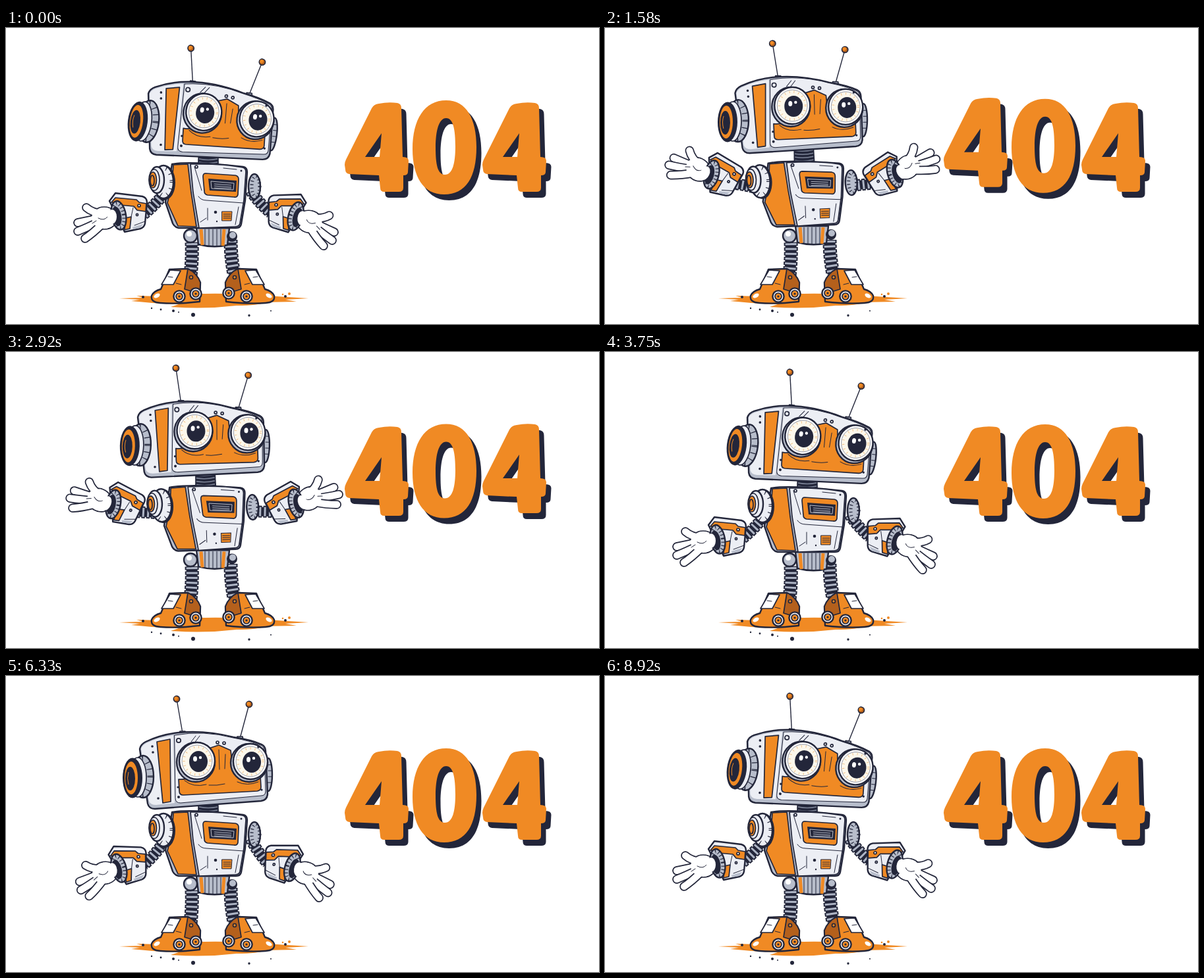
Write an HTML page that moves like this. It is 900x450 px and loops after 9.01 s.

```html
<!DOCTYPE html>
<html lang="en">
<head>
<meta charset="utf-8">
<title>404 robot</title>
<style>
  html, body { margin: 0; width: 100%; height: 100%; overflow: hidden; background: #fff; }
  svg { display: block; width: 900px; height: 450px; }
  .ink { stroke: #23263a; stroke-width: 1.7; stroke-linejoin: round; stroke-linecap: round; }
  .thin { stroke: #23263a; stroke-width: 1; fill: none; stroke-linecap: round; }
  .thick { stroke: #23263a; stroke-width: 2.4; stroke-linejoin: round; }
  .o { fill: #f08a24; } .w { fill: #eceef4; } .g { fill: #b7bdcb; }
  .n { fill: #23263a; } .p { fill: #fff; } .b { fill: #b4601c; } .none { fill: none; }
</style>
</head>
<body>
<svg id="stage" viewBox="0 0 900 450" xmlns="http://www.w3.org/2000/svg"></svg>
<script>
const LOOP = 9010, STEPS = 108;
const stage = document.getElementById('stage');

// Markup helpers
const path = (d, cls, more = '') => `<path d="${d}" class="${cls}" ${more}/>`;
const oval = (x, y, rx, ry, cls, more = '') =>
  `<ellipse cx="${x}" cy="${y}" rx="${rx}" ry="${ry}" class="${cls}" ${more}/>`;
const dot = (x, y, r, cls) => oval(x, y, r, r, cls);
const group = (id, body) => `<g id="${id}">${body}</g>`;
const stroke = (d, color, width, more = 'stroke-linecap="round"') =>
  `<path d="${d}" fill="none" stroke="${color}" stroke-width="${width}" ${more}/>`;

// Coils: a dark core, wider dark rings, grey ring faces
const spring = (id, d, w) => group(id,
  stroke(d, '#23263a', w - 4, '') +
  stroke(d, '#23263a', w, 'stroke-dasharray="5.4 2"') +
  stroke(d, '#aeb5c5', w - 4, 'stroke-dasharray="3 4.4" stroke-dashoffset="-1.2"'));

const ridges = (x, y, rx, ry, w, gap) =>
  oval(x, y, rx, ry, 'none', `stroke="#23263a" stroke-width="${w}" stroke-dasharray="1.2 ${gap}"`);

function digits() {
  const four = 'M566 115Q580 112 594 114Q600 115 600 122L602 196Q611 196 611 202L610 219Q610 224 603 224' +
    'L603 243Q603 249 596 249L574 249Q568 249 568 243L566 224L521 222Q515 221 515 215L514 208' +
    'Q514 204 516 200L555 122Q558 116 566 115ZM570 160L545 196L567 196Z';
  const zero = 'M668 110C699 110 714 138 714 181C714 227 698 253 665 253C633 253 617 226 617 184' +
    'C617 139 635 110 668 110ZM668 137C657 137 652 156 652 182C652 207 655 223 666 223' +
    'C678 223 682 205 682 180C682 155 679 137 668 137Z';
  return [[four, 0], [zero, 0], [four, 209]].map(([d, x], i) =>
    group('digit' + i,
      path(d, 'n', `fill-rule="evenodd" transform="translate(${x + 7.5} 9)"`) +
      path(d, 'o', `fill-rule="evenodd" transform="translate(${x} 0)"`))).join('');
}

function ground() {
  const specks = [[284, 436, 3], [254, 430, 2], [235, 428, 1.4], [221, 426, 1.2], [208, 409, 2],
    [369, 437, 1.7], [424, 408, 2], [402, 430, 1], [262, 432, 1]];
  return path('M172 411L208 410L198 407L232 408Q310 400 396 407L459 411L424 413L441 416L392 417' +
    'Q384 422 350 422Q300 428 250 424L262 420L222 418L190 415L203 413Z', 'o') +
    dot(430, 404, 2, 'o') + dot(420, 405, 1.3, 'o') +
    specks.map(s => dot(...s, 'n')).join('');
}

const wheel = (x, y) => dot(x, y, 8.6, 'w thick') + dot(x, y, 5, 'o ink') + dot(x, y, 1.6, 'n');

function feet() {
  const left = path('M248 367L276 366Q290 373 295 387L294 416Q260 420 234 418Q219 417 221 407Q224 400 235 397Z', 'o thick') +
    path('M276 366Q290 373 295 387L294 404L271 397Z', 'b ink') +
    path('M249 368L265 369L254 390L236 390Z', 'p ink') + path('M246 378l7 1M258 388l8 2', 'thin') +
    oval(229, 407, 5, 3, 'p', 'transform="rotate(-30 229 407)"') + dot(281, 379, 2.5, 'o ink');
  return left + wheel(263, 408) + wheel(288, 404) +
    `<g transform="translate(628 0) scale(-1 1)">${left}</g>` + wheel(338, 403) + wheel(365, 408);
}

function arm(name) {
  const thumb = 'M146 282Q131 281 122 273';
  const fingers = ['M142 289Q124 293 109 296', 'M142 294Q124 303 109 309', 'M146 298Q132 312 120 320'];
  const hand = oval(149, 289, 20, 17, 'p ink') +
    [thumb, ...fingers].map(d => stroke(d, '#23263a', 13.6) + stroke(d, '#fff', 10.2)).join('') +
    oval(149, 289, 19, 16, 'p') + path('M140 289Q149 294 154 287M131 297l6-4', 'thin');
  return group(name + 'Cuff',
    group(name + 'Hand', hand) +
    path('M157 263L166 251L207 256Q214 258 214 265L211 297Q210 303 204 305L180 310Z', 'w thick') +
    path('M160 265L166 258L198 261L202 265L213 267L212 279L199 277L194 271L172 269Z', 'o ink') +
    path('M181 289L190 287L188 305L180 307Z', 'o ink') +
    path('M192 303L208 298L204 304L193 306Z', 'g') +
    path('M190 287L193 273M195 300L211 294', 'thin') +
    dot(202, 270, 2, 'w ink') + dot(199, 284, 1.6, 'w ink') +
    `<g transform="rotate(-10 170 285)">` +
    oval(171, 285, 11, 22, 'g thick') + ridges(171, 285, 8, 18, 6, 4) + oval(168, 286, 7, 15, 'n') + '</g>' +
    oval(161, 287, 7, 11, 'p'));
}

function pelvis() {
  return path('M289 304L339 304L336 330Q315 335 292 329Z', 'g thick') +
    path('M296 306l2 24M331 306l-2 25', 'none', 'stroke="#f08a24" stroke-width="5"') +
    path('M302 306v25M308 306v26M314 306v26M320 306v26M326 306v25', 'thin') +
    dot(343, 317, 8, 'n') + dot(344, 315, 5, 'g');
}

function torso() {
  let neck = '';
  for (let y = 174; y < 208; y += 5) neck += path(`M293 ${y}Q307 ${y + 3} 321 ${y}`, 'none', 'stroke="#7f8699" stroke-width="1.6"');
  return oval(377, 241, 9, 19, 'g thick') + ridges(379, 241, 6, 15, 5, 4) +
    path('M292 172L322 172L323 209L291 209Z', 'n') + neck +
    path('M252 207Q280 202 360 211Q366 212 366 219L363 262L357 298Q356 304 349 304L262 304Q256 303 253 297L242 265Z', 'g thick') +
    path('M254 208L276 207L281 250L289 302L261 301L245 266L252 236Z', 'o ink') +
    path('M280 207Q330 206 359 212Q364 213 364 219L361 262L355 297Q354 302 348 302L293 304L284 250Z', 'w ink') +
    path('M292 256Q296 262 304 262L360 266M353 272l-5 27M286 211l11 36M295 295l9-6M306 274v18M330 213l20 2', 'thin') +
    path('M303 221L348 224Q353 225 353 230L352 253Q351 258 346 257L306 254Q301 253 301 248L299 226Q299 221 303 221Z', 'o ink') +
    path('M307 229L350 232L349 249L309 247Z', 'n') +
    path('M311 233L346 236L345 246L312 244Z', 'none', 'stroke="#dfe2ea" stroke-width="0.8"') +
    path('M316 237l26 2M316 240l26 2M316 243l26 1', 'none', 'stroke="#cdd2dd" stroke-width="0.8"') +
    path('M328 279h15l-1 14h-14Z', 'o thin', 'style="fill:#f08a24"') + path('M330 283h11M330 286h11M330 289h11', 'thin') +
    dot(318, 280, 2.3, 'n') + dot(289, 211, 2, 'w ink') + dot(357, 217, 1.5, 'n') + dot(320, 294, 1.2, 'n') +
    oval(242, 235, 15, 26, 'n') + oval(239, 234, 15, 25, 'w thick') + ridges(240, 234, 12, 21, 7, 9) +
    oval(229, 231, 11, 20, 'w thick') + oval(225, 231, 8, 16, 'w ink') +
    oval(223, 231, 5.5, 12, 'o ink') + oval(222, 232, 3, 8, 'o ink');
}

function eye(x, y, r) {
  return oval(x - 1, y + 2, r + 1, r + 2, 'g thick') + oval(x + 1, y, r - 1, r, 'p thick') +
    oval(x + 1, y, r - 5, r - 4, '', 'fill="#fdf8ec" stroke="#8e93a3" stroke-width="0.9"') +
    oval(x + 1, y, r - 8, r - 7, 'none', 'stroke="#f3c48c" stroke-width="3.5" stroke-dasharray="1 6"') +
    oval(x + 3, y + 1, 14, 16, 'n') + oval(x - 2, y - 3, 3, 4, 'p') + dot(x + 6, y - 5, 2.2, 'p');
}

function antenna(x, y, bx, by) {
  return path(`M${x} ${y}L${bx} ${by}`, 'none', 'stroke="#23263a" stroke-width="1.4"') +
    path(`M${bx - 4} ${by - 3}h8l1 6h-10Z`, 'g ink') + dot(x, y, 4.6, 'b ink') + dot(x - 1, y - 1, 2.8, 'o');
}

function head() {
  return oval(398, 150, 6, 25, 'g thick') + path('M397 135h6M398 144h6M398 153h6M397 162h6', 'thin') +
    antenna(259, 35, 268, 87) + antenna(369, 43, 355, 95) +
    path('M203 111Q204 104 212 100Q235 89 262 86Q302 82 345 93Q372 97 388 104Q394 107 394 114' +
      'L397 180Q396 189 387 190L226 202Q217 202 215 194Z', 'g thick') +
    path('M205 111Q206 106 213 102Q232 93 254 90L256 193L228 196Q219 196 217 190Z', 'w') +
    path('M229 100L249 96L250 191L238 193Z', 'o ink') +
    path('M256 90Q300 82 345 94Q372 99 386 105Q392 107 392 114L394 175Q394 182 387 182L265 193Q257 193 257 186Z', 'w thin', 'style="fill:#eceef4"') +
    path('M262 157Q290 160 304 120L305 111L323 105L341 113L345 145L386 152L387 169Q387 174 381 175L269 181Q263 181 263 175Z', 'o ink') +
    path('M323 112l1 30M313 120v25M333 119l-1 22M308 166Q320 167 332 164M271 159Q284 170 304 165M351 161Q366 168 383 161M288 91l-7 9M294 91l-9 12', 'thin') +
    eye(289, 129, 28) + eye(370, 130, 27) +
    dot(262, 98, 3.2, 'w ink') + dot(321, 101, 2, 'w ink') + dot(331, 102, 2, 'w ink') +
    dot(383, 108, 1.8, 'n') + dot(388, 173, 1.6, 'n') + dot(261, 169, 1.6, 'n') + dot(262, 184, 2, 'n') +
    dot(222, 107, 1.8, 'n') + dot(223, 116, 1.8, 'n') + dot(231, 186, 1.8, 'n') +
    oval(208, 153, 16, 32, 'g thick') + ridges(208, 153, 11, 27, 9, 9) +
    oval(200, 154, 13, 30, 'w ink') + oval(192, 155, 15, 30.5, 'n') +
    oval(190, 155, 10, 25, 'o') + oval(188.5, 156, 7.5, 18, 'n') +
    path('M186 146q-3 9 0 19', 'none', 'stroke="#f08a24" stroke-width="1"');
}

stage.innerHTML = digits() + ground() +
  spring('legL', 'M282 326Q283 350 280 376', 21) + spring('legR', 'M341 322Q341 348 346 373', 21) + feet() +
  group('pelvis', pelvis()) + dot(280, 316, 10, 'g thick') + dot(278, 313, 4, 'p') +
  spring('springL', '', 18) + spring('springR', '', 18) +
  arm('l') + `<g transform="translate(611 0) scale(-1 1)">${arm('r')}</g>` +
  group('torso', torso()) + group('head', head());

const el = id => document.getElementById(id);
const place = (id, x, y, turn, px, py) =>
  el(id).setAttribute('transform', `translate(${x} ${y}) rotate(${turn} ${px} ${py})`);

// Poses: head x, y, turn | torso lift, turn | arm x, y, turn, wrist (left, then right mirrored)
const POSE = {
  tilt:  [0, 0, 6.8, 0, 0, 0, 0, 0, 0, 0, 0, -5, -8],
  cheer: [-8, -13, -0.6, -4.5, -2.5, -11, -66, 29, 13, 0, -67, 33, 20],
  rest:  [0, 0, 0, 0, 0, 0, 6, -5, -4, 5, 4, -7, -8]
};
const TIMELINE = [[0, 'tilt'], [800, 'tilt'], [1870, 'cheer'], [2600, 'cheer'], [3500, 'tilt'],
  [4550, 'tilt'], [5250, 'rest'], [7500, 'rest'], [8500, 'tilt'], [LOOP, 'tilt']];

function poseAt(t) {
  const i = TIMELINE.findIndex(k => k[0] > t);
  const [t0, a] = TIMELINE[i - 1], [t1, b] = TIMELINE[i];
  const e = (1 - Math.cos(Math.PI * (t - t0) / (t1 - t0))) / 2;
  return POSE[a].map((v, n) => v + (POSE[b][n] - v) * e);
}

function spin([x, y], deg) {
  const a = deg * Math.PI / 180, c = Math.cos(a), s = Math.sin(a);
  return [x * c - y * s, x * s + y * c];
}

function poseArm(side, [x, y, turn, wrist], lift, lean) {
  const left = side === 'l';
  place(side + 'Cuff', x, y, turn, 187, 281);
  place(side + 'Hand', 0, 0, wrist, 165, 288);
  const e = spin([22, 2], turn);
  const elbow = [187 + x + e[0], 281 + y + e[1]];
  if (!left) elbow[0] = 611 - elbow[0];
  const root = left ? [243, 247] : [371, 247];
  const r = spin([root[0] - 318, root[1] - 330], lean);
  const sx = 318 + r[0], sy = 330 + r[1] + lift;
  const d = `M${sx} ${sy}Q${sx * 0.55 + elbow[0] * 0.45} ${sy * 0.4 + elbow[1] * 0.6} ${elbow[0]} ${elbow[1]}`;
  el(left ? 'springL' : 'springR').querySelectorAll('path').forEach(p => p.setAttribute('d', d));
}

function draw(t) {
  const p = poseAt(t);
  place('head', p[0], p[1], p[2], 305, 215);
  place('torso', 0, p[3], p[4], 318, 330);
  place('pelvis', 0, p[3] * 0.8, 0, 0, 0);
  poseArm('l', p.slice(5, 9), p[3], p[4]);
  poseArm('r', p.slice(9, 13), p[3], p[4]);
  for (let i = 0; i < 3; i++) {
    const u = Math.min(1, Math.max(0, (t - 1290 - 140 * i) / 1560));
    place('digit' + i, 0, -23 * Math.sin(Math.PI * u) ** 2, 0, 0, 0);
  }
}

const start = performance.now();
function tick() {
  const t = (performance.now() - start) % LOOP;
  // Small nudge keeps rounding from falling into the previous step
  draw(Math.floor((t + 5) % LOOP / LOOP * STEPS) * LOOP / STEPS);
  requestAnimationFrame(tick);
}
tick();
</script>
</body>
</html>
```
